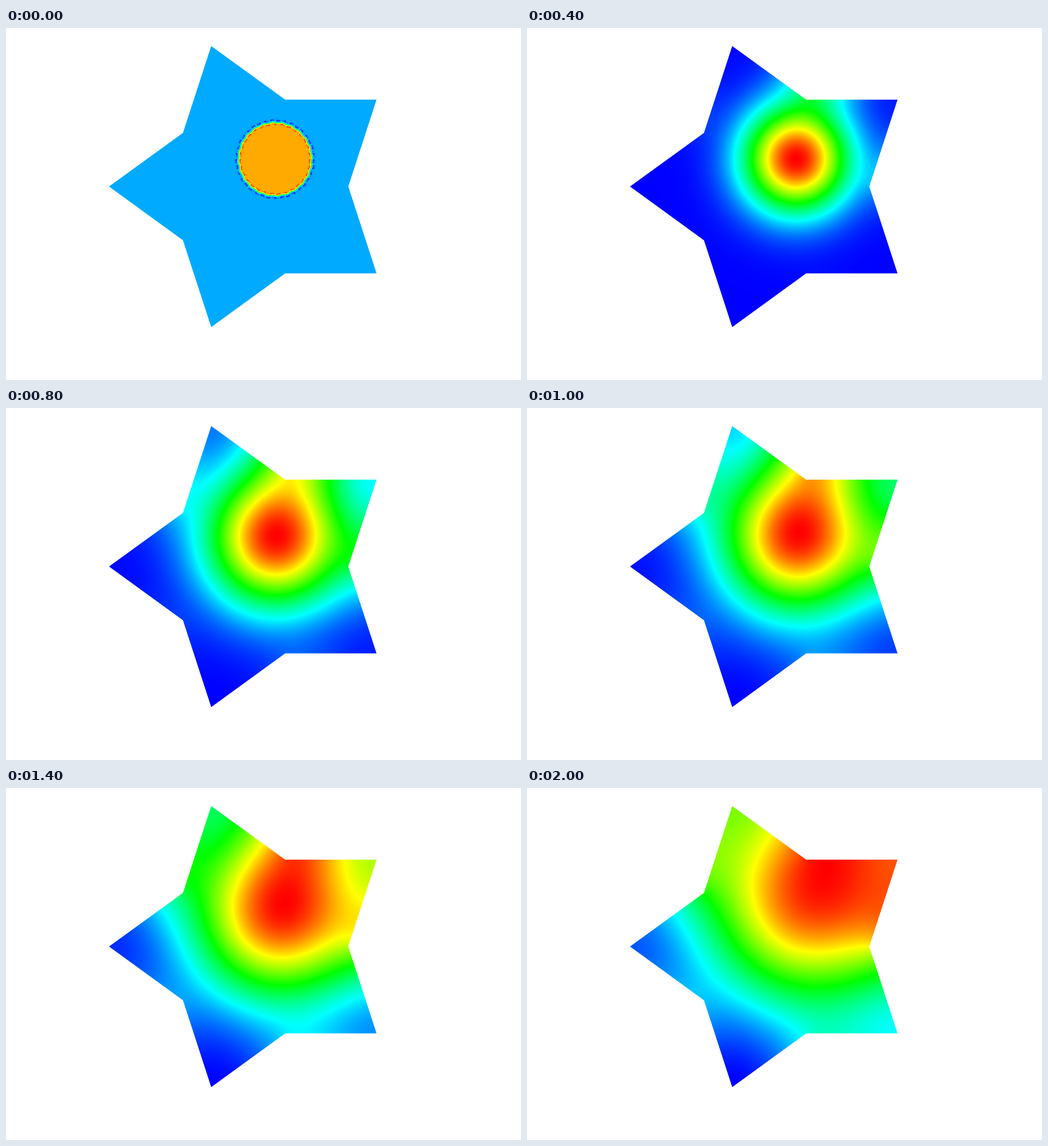
Recreate the animation shown at these times as an HTML page with a canvas. Size 905x619 px, loop 2.2 s.

```html
<!DOCTYPE html>
<html lang="en">
<head>
<meta charset="utf-8">
<title>Heat in a star</title>
<style>
  html, body { margin: 0; width: 100%; height: 100%; overflow: hidden; background: #fff; }
  canvas { display: block; }
</style>
</head>
<body>
<canvas id="stage" width="905" height="619"></canvas>
<script>
const ctx = document.getElementById('stage').getContext('2d');
const CX = 440.9, CY = 278.8, UNIT = 160.6;           // star centre, inner radius
const HOT = { x: CX + 0.2 * UNIT, y: CY - 0.3 * UNIT, r: 0.4 * UNIT };
const COUNT = 11, HOLD = 200, SPREAD = 0.03 * UNIT * UNIT;
const X0 = 180, Y0 = 30, W = 473, H = 498;            // area that holds the star

const star = new Path2D();
for (let k = 0; k < 10; k++) {
  const r = UNIT * (k % 2 ? (1 + Math.sqrt(5)) / 2 : 1);
  const a = k * Math.PI / 5;
  star.lineTo(CX + r * Math.cos(a), CY + r * Math.sin(a));
}
star.closePath();

const clamp = v => Math.max(0, Math.min(1, v));

// Blue, cyan, green, yellow, red for v from 0 to 1.
function paint(value) {
  const layer = document.createElement('canvas');
  layer.width = W;
  layer.height = H;
  const g = layer.getContext('2d');
  const img = g.createImageData(W, H);
  for (let y = 0, p = 0; y < H; y++) {
    for (let x = 0; x < W; x++, p += 4) {
      const v = clamp(value(X0 + x + 0.5, Y0 + y + 0.5));
      img.data[p] = 255 * clamp(4 * v - 2);
      img.data[p + 1] = 255 * clamp(Math.min(4 * v, 4 - 4 * v));
      img.data[p + 2] = 255 * clamp(2 - 4 * v);
      img.data[p + 3] = 255;
    }
  }
  g.putImageData(img, 0, 0);
  return layer;
}

// Sharp disc whose rim over- and undershoots in small specks.
function disc(x, y) {
  const dx = x - HOT.x, dy = y - HOT.y;
  let d = Math.hypot(dx, dy) - HOT.r;
  if (Math.abs(d) > 11) return d < 0 ? 5 / 6 : 1 / 6;
  const a = Math.atan2(dy, dx);
  d += 0.7 * Math.sin(24 * a);
  const bump = (at, w) => Math.exp(-(((d - at) / w) ** 2));
  const speck = n => clamp(0.5 + 0.6 * Math.sin(n * a) + 0.4 * Math.sin(2.3 * n * a));
  return 0.5 - Math.tanh(d / 1.3) / 3
    - 0.14 * bump(4, 1.6) * speck(37)
    + 0.13 * bump(-3, 1.2) * speck(31);
}

// Heat equation with insulated edges, explicit steps on a square grid.
const STEP = 2.5, RATE = 0.2, PAD = 3;
const COLS = Math.ceil(W / STEP) + 2 * PAD, ROWS = Math.ceil(H / STEP) + 2 * PAD;
const gx = i => X0 + (i % COLS - PAD) * STEP;
const gy = i => Y0 + (Math.floor(i / COLS) - PAD) * STEP;
const inside = new Uint8Array(COLS * ROWS);
const cells = [];
for (let i = 0; i < inside.length; i++) {
  if (ctx.isPointInPath(star, gx(i), gy(i))) {
    inside[i] = 1;
    cells.push(i);
  }
}
const sides = [1, -1, COLS, -COLS];
const slot = new Int32Array(inside.length);
cells.forEach((c, n) => { slot[c] = n; });
const near = new Int32Array(cells.length * 4);
cells.forEach((c, n) => sides.forEach((s, k) => {
  near[4 * n + k] = inside[c + s] ? slot[c + s] : n;
}));

let heat = Float64Array.from(cells, c =>
  clamp(0.5 - (Math.hypot(gx(c) - HOT.x, gy(c) - HOT.y) - HOT.r) / STEP));
let next = new Float64Array(heat.length);

function diffuse(steps) {
  for (let s = 0; s < steps; s++) {
    for (let n = 0, k = 0; n < heat.length; n++, k += 4) {
      next[n] = heat[n] + RATE * (heat[near[k]] + heat[near[k + 1]] +
        heat[near[k + 2]] + heat[near[k + 3]] - 4 * heat[n]);
    }
    [heat, next] = [next, heat];
  }
}

// Scaled field, continued a few cells past the edge for smooth sampling.
function sampler() {
  let lo = Infinity, hi = -Infinity;
  for (const v of heat) {
    lo = Math.min(lo, v);
    hi = Math.max(hi, v);
  }
  const field = new Float64Array(inside.length);
  let known = inside.slice();
  cells.forEach((c, n) => { field[c] = (heat[n] - lo) / (hi - lo); });
  for (let pass = 0; pass < 3; pass++) {
    const grown = known.slice();
    for (let i = COLS; i < field.length - COLS; i++) {
      if (known[i]) continue;
      const ok = sides.filter(s => known[i + s]);
      if (!ok.length) continue;
      field[i] = ok.reduce((sum, s) => sum + field[i + s], 0) / ok.length;
      grown[i] = 1;
    }
    known = grown;
  }
  return (x, y) => {
    const u = (x - X0) / STEP + PAD, v = (y - Y0) / STEP + PAD;
    const i = Math.floor(u), j = Math.floor(v), a = u - i, b = v - j;
    const q = j * COLS + i;
    return (field[q] * (1 - a) + field[q + 1] * a) * (1 - b) +
      (field[q + COLS] * (1 - a) + field[q + COLS + 1] * a) * b;
  };
}

const layers = [paint(disc)];
while (layers.length < COUNT) {
  diffuse(Math.round(SPREAD / (RATE * STEP * STEP)));
  layers.push(paint(sampler()));
}

ctx.fillStyle = '#fff';
const start = performance.now();
let shown = -1;
function draw() {
  const n = Math.floor((performance.now() - start) / HOLD) % COUNT;
  if (n !== shown) {
    shown = n;
    ctx.fillRect(0, 0, 905, 619);
    ctx.save();
    ctx.clip(star);
    ctx.drawImage(layers[n], X0, Y0);
    ctx.restore();
  }
  requestAnimationFrame(draw);
}
draw();
</script>
</body>
</html>
```
